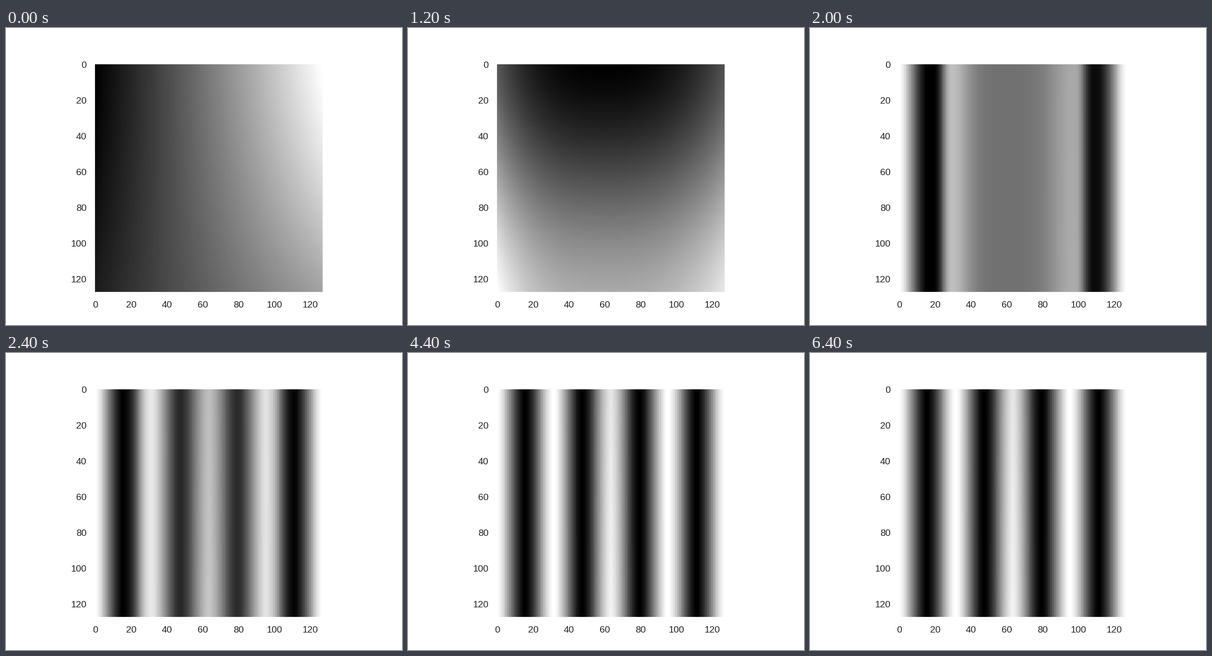
Write a matplotlib script that moves like this. It is 864 px wide and 648 px high and loops after 8000 ms.

```python
import numpy as np
import matplotlib.pyplot as plt
from matplotlib.animation import FuncAnimation

STEP, FRAMES, N = 200, 40, 128
PERIOD = 32

plt.rcParams.update({
    "font.family": "Liberation Sans",
    "font.size": 11,
    "axes.edgecolor": "white",
    "axes.linewidth": 1.25,
})

x, y = np.meshgrid(np.arange(N), np.arange(N))
u, v = x / (N - 1), y / (N - 1)


def bump(center, width):
    return np.exp(-((x - center) / width) ** 2)


def smoothstep(t):
    t = np.clip(t, 0, 1)
    return t * t * (3 - 2 * t)


def wave():
    """Cosine stripes with slightly straightened flanks, from 0 to 1."""
    phase = (x + 0.5) / PERIOD
    cosine = 0.5 + 0.5 * np.cos(2 * np.pi * phase)
    triangle = np.abs(1 - 2 * (phase % 1))
    return 0.7 * cosine + 0.3 * triangle


def slope():
    top = 0.9 * u + 0.1 * u ** 2
    bottom = 0.11 + 0.57 * u - 0.05 * u ** 2
    return top + (bottom - top) * v ** 1.4


def ramp():
    s = 0.3 * (1 - np.cos(np.pi * v)) + 0.4 * v
    return 0.5 + (s - 0.5) * (1 - 0.46 * (u - 0.45) ** 2)


def valley():
    d = (x - 62) / np.where(x < 62, 62, 65)
    left = (0.62 + 0.09 * v) * np.abs(d) ** 3.1
    right = 0.55 * np.abs(d) ** 2.5
    return 0.29 * v ** 1.4 + np.where(d < 0, left, right)


def two_bands():
    """Stripes formed at both sides, a grey plateau between them."""
    plateau = 0.44 + 0.3 * bump(29, 11) + (0.21 + 0.01 * v) * bump(97, 14)
    inner = plateau * smoothstep((45 - np.abs(x - 64)) / 10)
    outer = np.abs(x - 63.5) > 48
    return np.where(outer, wave(), inner) + 0.05 * bump(112, 6)


def even_bands():
    height = 0.97 - (0.1 - 0.05 * v) * bump(63.5, 14)
    return wave() * height


stages = [slope(), ramp(), valley(), two_bands(), even_bands()]
times = [0, 400, 800, 1600, 2000, 2600]
levels = [0, 1, 1, 2, 3, 4]


def field(frame):
    p = np.interp(frame * STEP, times, levels)
    k = min(int(p), len(stages) - 2)
    f = stages[k] + (stages[k + 1] - stages[k]) * (p - k)
    return (f - f.min()) / (f.max() - f.min())


fig, ax = plt.subplots(figsize=(6.4, 4.8), dpi=135)
image = ax.imshow(field(0), cmap="gray", vmin=0, vmax=1, interpolation="nearest")
ax.set_xticks(range(0, N, 20))
ax.set_yticks(range(0, N, 20))
ax.tick_params(length=6, pad=3.5, bottom=False, left=False, labelcolor="0.15")


def update(frame):
    image.set_data(field(frame))
    return [image]


anim = FuncAnimation(fig, update, frames=FRAMES, interval=STEP, repeat=True, repeat_delay=0)
plt.show()
```
